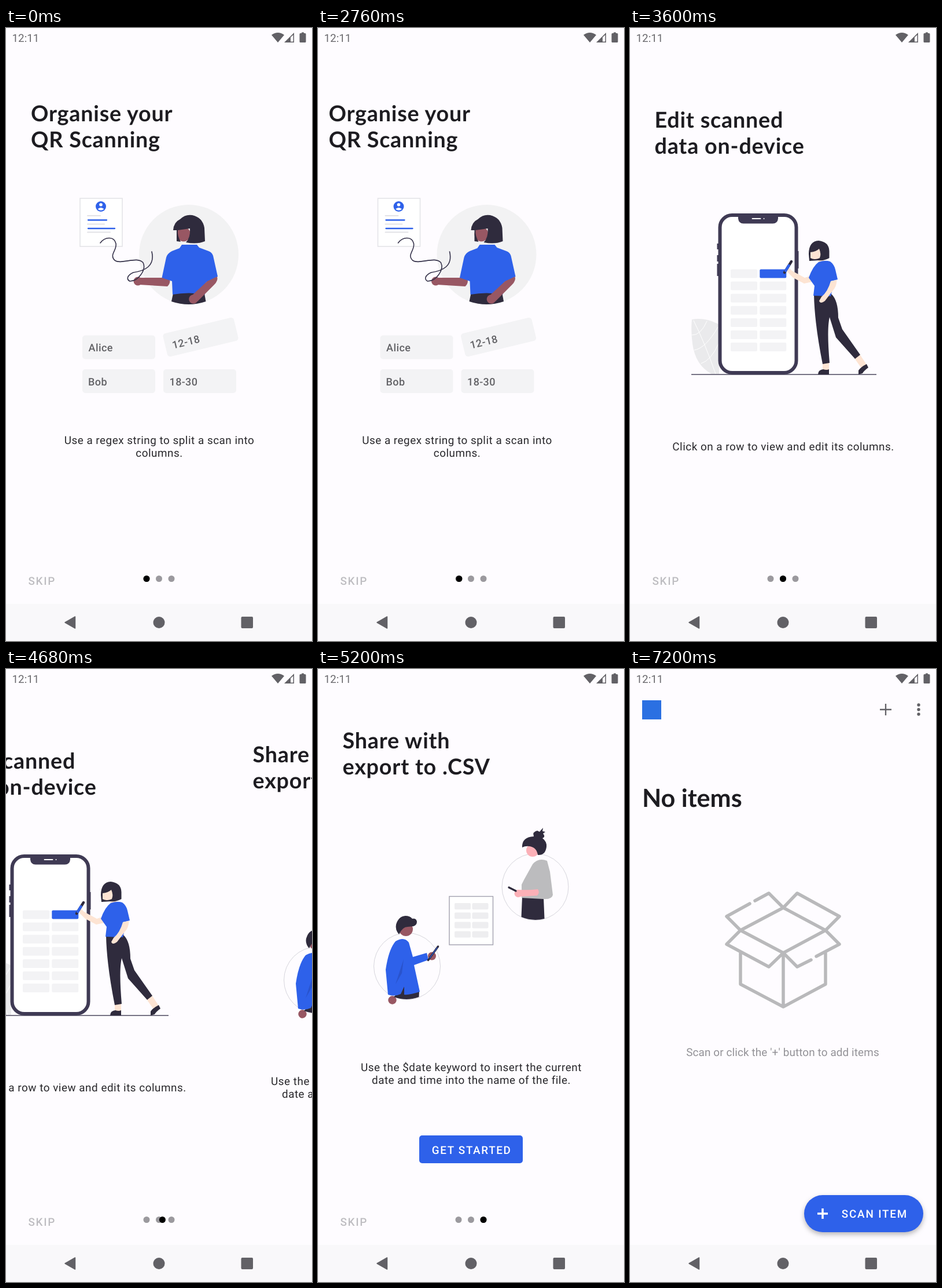
An HTML page for the animation above (8240 ms loop, 529 by 1058 pixels).

```html
<!DOCTYPE html>
<html lang="en">
<head>
<meta charset="utf-8">
<title>Onboarding</title>
<style>
  html, body { margin: 0; width: 100%; height: 100%; overflow: hidden; background: #fefcff; }
  svg { display: block; width: 100vw; height: 100vh; }
  text { font: 18.86px Roboto, sans-serif; fill: #29282c; text-rendering: geometricPrecision; }
  .title { font: 700 37.7px Lato, sans-serif; letter-spacing: .8px; fill: #1d1c21; }
  .body { letter-spacing: .52px; text-anchor: middle; }
  .caps { font-weight: 500; letter-spacing: 1.68px; }
  .chip { font-size: 18px; font-weight: 500; letter-spacing: .4px; fill: #626266; }
  .blue { fill: #2e61ea; }
  .ink { fill: #2f2b3d; }
  .brown { fill: #985763; }
  .peach { fill: #fde4d3; }
  .pink { fill: #fbb0b7; }
  .pale { fill: #f3f3f5; }
  .white { fill: #fff; }
  .icon { fill: #626166; }
  .line { fill: none; stroke-linecap: round; stroke-linejoin: round; }
</style>
</head>
<body>
<svg viewBox="0 0 529 1058" preserveAspectRatio="none">
  <defs>
    <clipPath id="buttonShape"><rect x="175" y="805" width="179" height="48" rx="5"/></clipPath>
    <clipPath id="reveal"><rect id="revealBox" x="170" width="190"/></clipPath>
  </defs>
  <rect width="529" height="1058" fill="#fefcff"/>

  <g id="intro">
    <g id="page0">
      <text class="title" x="43" y="160.5">Organise your</text>
      <text class="title" x="43" y="205.5">QR Scanning</text>

      <circle cx="316" cy="391" r="86" fill="#f2f2f3"/>
      <rect x="128" y="294" width="73" height="83" fill="#fff" stroke="#e4e4e8" stroke-width="1.6"/>
      <circle class="blue" cx="164" cy="308" r="9"/>
      <circle class="white" cx="164" cy="305" r="2.8"/>
      <path class="white" d="M158.5 312.5Q164 307.5 169.5 312.5Q164 317 158.5 312.5Z"/>
      <path class="line" stroke="#e2e2e6" stroke-width="2" d="M141 324H163M141 338.5H170M141 352.5H180"/>
      <path class="line" stroke="#2e61ea" stroke-width="2.3" d="M142 331.5H174M142 346H188"/>

      <path class="brown" d="M228 431L282 431Q286 439 279 446L230 443Z"/>
      <circle class="brown" cx="228" cy="437" r="7.5"/>
      <path class="ink" d="M289 458Q316 454 343 458L345.5 472Q316 482 286 472Z"/>
      <path class="blue" d="M304 374H330L334 379L350 385Q356 387 358 393L366 429L346 439L344 442V460Q316 455 288 460L287 437L269.5 431L277 396Q279 389 287 385L300 380Z"/>
      <path class="brown" d="M348 437L365 429Q367 436 360 443L331 472L321 462Z"/>
      <circle class="brown" cx="324" cy="468" r="7.8"/>
      <ellipse class="brown" cx="307" cy="356" rx="12" ry="12.5"/>
      <path class="ink" d="M289 349Q290 335 301 330Q310 321 322 323Q340 327 343 345L344 368Q330 374 311 370Q319 362 318 346L297 349Q296 358 302 369L295 368V349Z"/>
      <path class="line" stroke="#35324a" stroke-width="1.6" d="M163 371C171 360 187 359 190 372C192 384 178 391 188 401C199 409 227 393 237 405C243 417 229 437 214 437C208 434 209 427 220 422C240 419 258 411 252 386"/>

      <g class="pale">
        <rect x="132" y="530.5" width="126" height="41" rx="5"/>
        <rect x="132" y="589" width="126" height="41" rx="5"/>
        <rect x="272" y="589" width="126" height="41" rx="5"/>
      </g>
      <text class="chip" x="142.5" y="558">Alice</text>
      <text class="chip" x="142" y="616.5">Bob</text>
      <text class="chip" x="282.5" y="616.5">18-30</text>
      <g transform="translate(336.5 533.5) rotate(-13.5)">
        <rect class="pale" x="-63" y="-20.5" width="126" height="41" rx="5"/>
        <text class="chip" x="-51" y="8.5">12-18</text>
      </g>
      <text class="body" x="265" y="718">Use a regex string to split a scan into</text>
      <text class="body" x="265" y="740">columns.</text>
    </g>

    <g id="page1">
      <text class="title" x="42.5" y="171.5">Edit scanned</text>
      <text class="title" x="42.5" y="216.5">data on-device</text>

      <path fill="#eaeaec" d="M107 503Q132 499 154 512V597H141Q113 582 108 545Q105 523 107 503Z"/>
      <path class="line" stroke="#fff" stroke-width="1" d="M110 505Q130 545 148 597M107 530Q122 531 133 506M111 556Q131 553 152 516M123 579Q140 574 153 545"/>
      <path stroke="#4a475c" stroke-width="1.4" d="M106 598H426"/>
      <path stroke="#3f3a54" stroke-width="3" d="M152 372V382M152 392V403M152 407V428M290 385V415"/>
      <rect x="155.5" y="323" width="132" height="272" rx="21" fill="#fff" stroke="#3f3a54" stroke-width="6"/>
      <path fill="#3f3a54" d="M187 322H256V329Q255 337.5 247 337.5H196Q188 337.5 187 329Z"/>
      <path class="line" stroke="#fff" stroke-width="1.8" d="M211.5 329H225.5M231.5 329H231.6"/>
      <g id="phoneCells" class="pale"></g>

      <path class="peach" d="M273 412L280 419L302 431L315 427V438L301 441L282 431L272 421Z"/>
      <path class="line" stroke="#2f2b3d" stroke-width="4.5" d="M267 422L279 403"/>
      <path class="line" stroke="#2e61ea" stroke-width="4.5" d="M269 419L274.5 410"/>
      <path class="peach" d="M333 576H344V591H333ZM388 570L397 563L409 581L400 587Z"/>
      <path class="ink" d="M325 598Q325 590 334 589Q340 591 344 589V598ZM395 598V591Q399 585 409 580L412 586Q404 592 402 596Z"/>
      <path class="ink" d="M318 460L348 459Q360 470 360 500L367 520L398 564L389 571L356 534L345 499Q340 520 345 578L333 580Q319 510 318 460Z"/>
      <path class="peach" d="M322 395H334L338 406H327Z"/>
      <path class="blue" d="M326 404Q337 400 346 403Q353 408 355 417L359 434L347 437L349 455L347 463L317 462L319 445L309 431Q316 411 326 404Z"/>
      <path class="peach" d="M347 437L357.5 435Q357 447 350 454L337 471Q329 477 327 471L331 464Q342 455 347 437Z"/>
      <path class="ink" d="M310 402L309 390Q309 368 326 367Q344 369 344.5 385V397Q336 402 326 401Z"/>
      <path class="peach" d="M312 387Q322 386 327 381Q331 390 328 397Q319 401 312 397Z"/>
      <text class="body" x="265" y="729">Click on a row to view and edit its columns.</text>
    </g>

    <g id="page2">
      <g id="shareContent">
        <text class="title" x="42.5" y="136.5">Share with</text>
        <text class="title" x="42.5" y="181.5">export to .CSV</text>

        <g fill="none" stroke="#d6d5dc">
          <circle cx="154" cy="513" r="57.5"/>
          <circle cx="375.5" cy="376" r="57.5"/>
        </g>
        <rect x="227" y="392.5" width="75.5" height="83.5" fill="#fff" stroke="#a3a1af" stroke-width="1.4"/>
        <g id="sheetCells" fill="#eeeef0"></g>

        <circle class="brown" cx="128.5" cy="571.5" r="7.2"/>
        <path class="ink" d="M148 548L175 556L174.5 566Q153 574 131 566Z"/>
        <path class="blue" d="M134 470Q149 461 157 472L164 497L188 490L191 502L166 511L176 557Q158 563 149 562V548L143 561Q132 566 121 562L117 519Q122 484 134 470Z"/>
        <path fill="#2953cd" d="M148 501L134 544L145 525Z"/>
        <circle class="brown" cx="197" cy="495.5" r="7"/>
        <path class="line" stroke="#2f2b3d" stroke-width="3.5" d="M190.5 502.5L207.5 479"/>
        <path class="line" stroke="#2e61ea" stroke-width="1.2" d="M193 499L206 481"/>
        <circle class="brown" cx="152" cy="449" r="12"/>
        <path class="ink" d="M140 458Q133 450 135 441Q139 427 151 426Q159 426 163 431Q170 430 171 436Q171 442 165 444L155 445Q146 445 140 458Z"/>

        <path class="ink" d="M353 393L390 395L391.5 431Q371 436 351.5 428Z"/>
        <path fill="#bcbcbe" d="M371 337Q381 325 396 331L401 350L406 390Q404 398 390 397L352 395V372L356 364Z"/>
        <path class="pink" d="M345 381Q366 382 380 380Q384 386 379 391L346 393Z"/>
        <circle class="pink" cx="346" cy="387.5" r="6.5"/>
        <path class="line" stroke="#2f2b3d" stroke-width="3.3" d="M330 377L342 383"/>
        <circle class="pink" cx="371" cy="313" r="11"/>
        <path class="ink" d="M353 308Q352 290 373 289Q370 281 379 279L383 281L389 274L388 280L393 281L389 284Q394 290 388 292Q396 298 395 307Q393 322 380 321Q378 308 366 306Q358 305 353 308Z"/>
        <text class="body" x="265" y="694">Use the $date keyword to insert the current</text>
        <text class="body" x="265" y="716">date and time into the name of the file.</text>
      </g>
      <g clip-path="url(#reveal)">
        <g id="button">
          <rect class="blue" x="175" y="805" width="179" height="48" rx="5"/>
          <circle id="ripple" clip-path="url(#buttonShape)" fill="#fff" fill-opacity=".16"/>
          <text class="caps" x="196.8" y="836.5" style="fill:#fff">GET STARTED</text>
        </g>
      </g>
    </g>

    <text class="caps" x="38.5" y="960.5" style="fill:#bebdc1">SKIP</text>
    <g fill="#9b999e">
      <circle cx="243" cy="950.5" r="5.5"/>
      <circle cx="264.5" cy="950.5" r="5.5"/>
      <circle cx="286" cy="950.5" r="5.5"/>
    </g>
    <circle id="activeDot" cy="950.5" r="5.5"/>
  </g>

  <g id="home">
    <rect x="21" y="54" width="33" height="33" fill="#2b70e2"/>
    <path stroke="#626166" stroke-width="2.3" d="M432 70H452M442 60V80"/>
    <g class="icon">
      <circle cx="499" cy="62" r="2.7"/><circle cx="499" cy="70" r="2.7"/><circle cx="499" cy="78" r="2.7"/>
    </g>
    <text class="title" x="21" y="237.5" style="font-size:43.1px;letter-spacing:0">No items</text>
    <path class="line" stroke="#b9b9bb" stroke-width="5.5" d="M265 412L338 451L265 490L191 451ZM191 451L167 427L207 405M216 400L240 387L265 412L289 387L362 427L338 451L362 475L322 496M313 502L289 514L265 490L240 514L167 475L191 451M191 490V544L265 583L338 544V490M265 490V583"/>
    <text class="body" x="264" y="667.5" style="fill:#939297;letter-spacing:.13px">Scan or click the '+' button to add items</text>
    <rect class="blue" x="301" y="908" width="206" height="64" rx="32" style="filter:drop-shadow(0 4px 4px rgba(0,0,0,.28))"/>
    <path stroke="#fff" stroke-width="3.5" d="M324 940H342M333 931V949"/>
    <text class="caps" x="365.8" y="946.5" style="fill:#fff;letter-spacing:1.8px">SCAN ITEM</text>
  </g>

  <g class="icon">
    <text x="10.5" y="23.5" style="fill:#6b6a6e">12:11</text>
    <path d="M459 12Q470 4 481 12L470 25ZM498 8V25H481Z"/>
    <path fill="#fefcff" d="M492 16L496.5 12V23.5H492Z"/>
    <path d="M511 7.5H515V9H517Q518.5 9 518.5 10.5V23.5Q518.5 25 517 25H509Q507.5 25 507.5 23.5V10.5Q507.5 9 509 9H511Z"/>
    <rect y="994" width="529" height="64" fill="#f9f8fa"/>
    <path stroke="#626166" stroke-width="1.5" stroke-linejoin="round" d="M102 1026L119.5 1016V1036Z"/>
    <circle cx="264.5" cy="1026" r="10"/>
    <rect x="406.5" y="1016" width="20.5" height="20" rx="2"/>
  </g>
</svg>

<script>
const LOOP = 8240, STEP = 40, WIDTH = 529;
const $ = id => document.getElementById(id);
const set = (id, attrs) => {
  for (const key in attrs) $(id).setAttribute(key, attrs[key]);
};
const clamp = v => Math.min(1, Math.max(0, v));

// Finger drag as [ms, px] points, then a damped spring onto the next page.
const swipes = [
  { drag: [[2720, 0], [2760, 24.5], [2960, 250]], speed: 1.15, stiffness: .012, end: 3600 },
  { drag: [[4560, 0], [4600, 25], [4680, 145], [4720, 215]], speed: 1.75, stiffness: .014, end: 5200 }
];
const REVEAL_AT = 4740, REVEAL_END = 5200, PRESS_AT = 6360, FADE_AT = 6440, FADE_END = 6880;

function grid(id, rows, x, y, pitchX, pitchY, w, h) {
  for (let i = 0; i < rows * 2; i++) {
    const cell = document.createElementNS("http://www.w3.org/2000/svg", "rect");
    const attrs = { x: x + i % 2 * pitchX, y: y + (i >> 1) * pitchY, width: w, height: h, rx: 2 };
    for (const key in attrs) cell.setAttribute(key, attrs[key]);
    $(id).append(cell);
  }
}
grid("phoneCells", 7, 174, 416.5, 50.3, 21.1, 46, 15);
$("phoneCells").children[1].setAttribute("class", "blue");
grid("sheetCells", 4, 236, 404, 30.5, 16.2, 28, 11);

function swipeOffset({ drag, speed, stiffness, end }, t) {
  if (t <= drag[0][0]) return 0;
  if (t >= end) return WIDTH;
  for (let i = 1; i < drag.length; i++) {
    const [t0, x0] = drag[i - 1], [t1, x1] = drag[i];
    if (t <= t1) return x0 + (x1 - x0) * (t - t0) / (t1 - t0);
  }
  const [released, x] = drag[drag.length - 1];
  const dt = t - released, gap = WIDTH - x;
  return WIDTH - (gap + (stiffness * gap - speed) * dt) * Math.exp(-stiffness * dt);
}

function reveal(t) {
  const k = Math.max(0, t - REVEAL_AT) * .02;
  return t >= REVEAL_END ? 1 : 1 - (1 + k) * Math.exp(-k);
}

function draw(t) {
  const scroll = swipes.reduce((sum, swipe) => sum + swipeOffset(swipe, t), 0);
  for (let i = 0; i < 3; i++) set("page" + i, { transform: `translate(${i * WIDTH - scroll} 0)` });
  set("activeDot", { cx: 243 + scroll / WIDTH * 21.5 });

  const shown = reveal(t), hidden = 24 * (1 - shown);
  set("shareContent", { transform: `translate(0 ${hidden})` });
  set("button", { transform: `translate(0 ${-hidden})`, opacity: shown });
  set("revealBox", { y: 829 - 24 * shown, height: 48 * shown });

  const grow = clamp((t - PRESS_AT) / 160);
  set("ripple", { cx: 240 + 24 * grow, cy: 822 + 7 * grow, r: t >= PRESS_AT ? 62 + 38 * grow : 0 });

  const p = clamp((t - FADE_AT) / (FADE_END - FADE_AT));
  const fade = p * p * (3 - 2 * p);
  set("intro", { opacity: 1 - fade });
  set("home", { opacity: fade });
}

const start = performance.now();
function tick() {
  const t = (performance.now() - start) % LOOP;
  draw(Math.floor(t / STEP) * STEP);
  requestAnimationFrame(tick);
}
tick();
</script>
</body>
</html>
```
